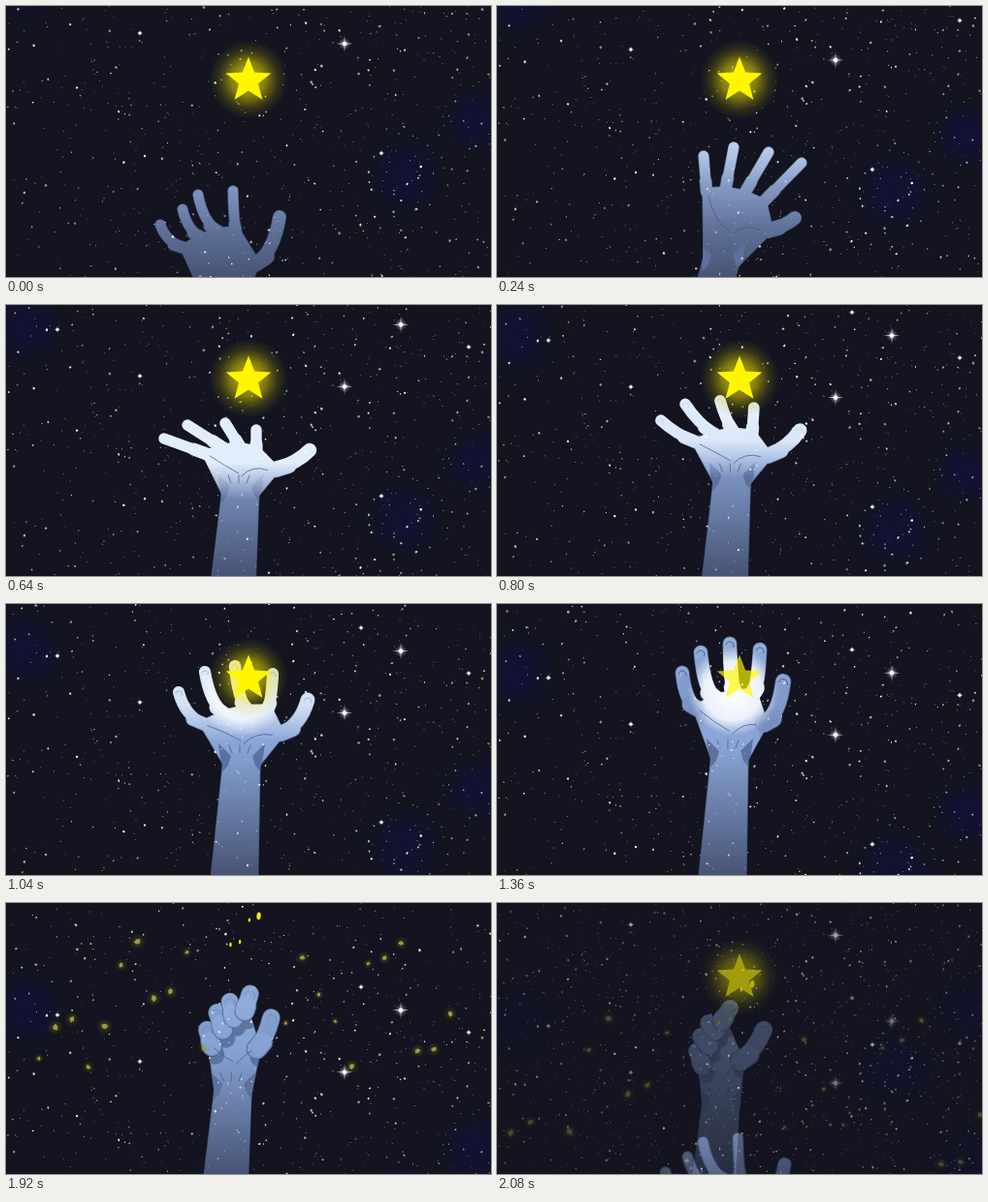
Animation, 500 px wide and 280 px high, one loop 2160 ms. Source, as an HTML page with a canvas:

```html
<!DOCTYPE html>
<html lang="en">
<head>
<meta charset="utf-8">
<title>Reaching for a star</title>
<style>
html, body { margin: 0; width: 100%; height: 100%; overflow: hidden; background: #13141f; }
canvas { display: block; width: 500px; height: 280px; }
</style>
</head>
<body>
<canvas id="stage" width="500" height="280"></canvas>
<script>
const W = 500, H = 280, LOOP = 2160, STEP = 80, FADE_FROM = 1920, BURST = 1440;
const DRIFT = 0.0707; // sky speed, px per ms
const BG = '#13141f', INK = '#43557f', SHADE = '#5c719f', TAU = Math.PI * 2;
const stage = document.getElementById('stage').getContext('2d');
const sheet = () => Object.assign(document.createElement('canvas'), { width: W, height: H }).getContext('2d');
const next = sheet(), hand = sheet();

let seed = 4711;
const rnd = () => (seed = (seed * 16807) % 2147483647) / 2147483647;
const between = (a, b) => a + (b - a) * rnd();
const clamp = v => Math.max(0, Math.min(1, v));
const ramp = (t, from, to) => clamp((t - from) / (to - from));

// Blends numbers, points and whole poses
function mix(a, b, u) {
  if (typeof a === 'number') return a + (b - a) * u;
  if (Array.isArray(a)) return a.map((v, i) => mix(v, b[i], u));
  return Object.fromEntries(Object.keys(a).map(k => [k, mix(a[k], b[k], u)]));
}

function radial(c, x, y, r, stops) {
  const g = c.createRadialGradient(x, y, 0, x, y, r);
  stops.forEach(([at, col]) => g.addColorStop(at, col));
  c.fillStyle = g;
  c.fillRect(x - r, y - r, 2 * r, 2 * r);
}

function vertical(c, y0, y1, stops) {
  const g = c.createLinearGradient(0, y0, 0, y1);
  stops.forEach(([at, col]) => g.addColorStop(at, col));
  return g;
}

function starPath(c, x, y, spikes, outer, inner) {
  c.beginPath();
  for (let i = 0; i < spikes * 2; i++) {
    const a = i * Math.PI / spikes - TAU / 4, r = i % 2 ? inner : outer;
    c.lineTo(x + Math.cos(a) * r, y + Math.sin(a) * r);
  }
  c.closePath();
}

// Key poses. Tips run from little finger to thumb; hook bends the fingers, fold closes the fist
const poses = [
  { t: 0, wrist: [224, 300], left: [184, 250], right: [237, 232], hook: .25, fold: 0, light: .1, glow: 0,
    tips: [[159, 226], [182, 210], [198, 195], [234, 191], [282, 218]] },
  { t: 240, wrist: [232, 260], left: [216, 192], right: [274, 203], hook: 0, fold: 0, light: .6, glow: 0,
    tips: [[213, 155], [244, 146], [280, 151], [314, 162], [307, 219]] },
  { t: 640, wrist: [242, 190], left: [207, 154], right: [258, 150], hook: 0, fold: 0, light: 1, glow: 0,
    tips: [[163, 138], [187, 124], [226, 122], [258, 129], [313, 150]] },
  { t: 1040, wrist: [243, 160], left: [204, 124], right: [270, 108], hook: .25, fold: .1, light: .95, glow: .9,
    tips: [[178, 91], [205, 70], [236, 64], [275, 72], [311, 99]] },
  { t: 1360, wrist: [240, 155], left: [206, 108], right: [264, 92], hook: .3, fold: .45, light: .15, glow: 1,
    tips: [[191, 71], [210, 50], [240, 41], [271, 47], [295, 80]] },
  { t: 1680, wrist: [239, 167], left: [213, 118], right: [267, 96], hook: 0, fold: 1, light: .1, glow: 0,
    tips: [[209, 98], [229, 76], [250, 69], [269, 71], [271, 100]] },
  { t: 2080, wrist: [231, 205], left: [212, 168], right: [232, 122], hook: 0, fold: .85, light: .1, glow: 0,
    tips: [[206, 153], [210, 138], [218, 124], [240, 109], [275, 131]] }
];

function poseAt(t) {
  const i = Math.max(0, poses.findLastIndex(p => p.t <= t));
  const a = poses[i], b = poses[i + 1] || a;
  return mix(a, b, a === b ? 0 : ramp(t, a.t, b.t));
}

// Arm, palm and limbs worked out from a pose
function anatomy(p) {
  const [wx, wy] = p.wrist, half = 19;
  const foot = 18 + Math.max(0, 290 - wy) * .05;
  const arm = [[wx - half, wy], [wx + half, wy], [wx - 8 + foot, 290], [wx - 8 - foot, 290]];
  const roots = [0, 1, 2, 3].map(i => {
    const [x, y] = mix(p.left, p.right, i / 3);
    return [x, y - (i % 3 ? 5 : 0)];
  });
  const [tx, ty] = mix(p.right, arm[1], .5);
  roots.push([tx + mix(18, 8, p.fold), ty]);
  const palm = [[wx - half + 4, wy + 5], ...roots, [wx + half - 4, wy + 5]];
  const limbs = roots.map((root, i) => {
    const tip = p.tips[i], h = i === 4 ? Math.max(.15, p.hook) : p.hook;
    const joint = [mix(root[0], tip[0], .5 + h), mix(root[1], tip[1], .5 - h)];
    return { root, joint, tip, r: mix(i === 4 ? 6.5 : 5, 9, p.fold) };
  });
  return { arm, palm, limbs };
}

function poly(c, pts) {
  c.beginPath();
  pts.forEach(q => c.lineTo(...q));
  c.closePath();
}

function limb(c, { root, joint, tip, r }, col, extra = 0) {
  c.strokeStyle = col;
  c.lineWidth = 2 * (r + extra);
  c.beginPath();
  c.moveTo(...root);
  c.quadraticCurveTo(...joint, ...tip);
  c.stroke();
  c.lineWidth *= 1.15;
  c.beginPath();
  c.moveTo(...root);
  c.lineTo(...mix(root, joint, .6));
  c.stroke();
}

function body(c, { arm, palm, limbs }, col, extra) {
  c.fillStyle = c.strokeStyle = col;
  for (const [pts, pad] of [[arm, 0], [palm, 4]]) {
    poly(c, pts);
    c.fill();
    c.lineWidth = 2 * (pad + extra) || .1;
    c.stroke();
  }
  limbs.forEach(l => limb(c, l, col, extra));
}

function creases(c, p, { palm, limbs }) {
  const [wx, wy] = p.wrist, heart = mix(p.wrist, mix(p.left, p.right, .5), .45);
  const side = limbs[4].root;
  c.strokeStyle = INK;
  c.lineWidth = .9;
  c.globalAlpha = .8;
  c.beginPath();
  c.moveTo(...mix(p.left, heart, .1));
  c.quadraticCurveTo(heart[0] - 14, heart[1] - 8, heart[0] + 2, heart[1] + 1);
  c.moveTo(...mix(side, heart, .2));
  c.quadraticCurveTo(heart[0] + 16, heart[1] - 8, heart[0] + 5, heart[1] + 4);
  for (const k of [-1, 0, 1]) {
    c.moveTo(wx + k * 11 - 2, wy - 14);
    c.lineTo(wx + k * 8 - 2, wy - 6);
  }
  c.stroke();
  // Nails show while the fingers are half closed
  c.globalAlpha = 4 * p.fold * (1 - p.fold);
  for (const { tip: [x, y], r } of limbs) {
    c.beginPath();
    c.arc(x, y + 2, r * .6, Math.PI * 1.1, Math.PI * 2.1);
    c.stroke();
  }
  c.globalAlpha = 1;
}

function drawHand(c, t) {
  const late = Math.min(0, t); // before the loop point the hand is still below
  const p = poseAt(t), a = anatomy(p), [wx, wy] = p.wrist, h = hand;
  const top = Math.min(...p.tips.map(q => q[1])) - 6;
  const skin = vertical(h, 60, 285, [[0, 'rgb(144,174,224)'], [.4, 'rgb(136,163,212)'], [1, 'rgb(68,80,112)']]);

  h.clearRect(0, 0, W, H);
  h.lineCap = h.lineJoin = 'round';
  body(h, a, INK, .7);
  body(h, a, skin, 0);
  h.globalCompositeOperation = 'source-atop';

  // Wrist shadows
  h.fillStyle = SHADE;
  for (const s of [-1, 1]) {
    poly(h, [[wx + s * 24, wy - 16], [wx + s * 11, wy - 3], [wx + s * 14, wy + 7], [wx + s * 20, wy + 14]]);
    h.fill();
  }
  // Closed fingers lie over the palm
  for (const l of a.limbs) {
    h.globalAlpha = clamp(p.fold * 1.6 - .6);
    h.save();
    h.translate(3, 9);
    limb(h, l, SHADE);
    h.restore();
  }
  for (const l of a.limbs) {
    h.globalAlpha = clamp(p.fold * 1.6 - .6);
    limb(h, l, INK, .6);
    limb(h, l, skin);
  }
  h.globalAlpha = 1;

  const pale = alpha => `rgba(226,237,252,${alpha})`;
  h.fillStyle = vertical(h, top, top + 85, [[0, pale(p.light)], [.55, pale(p.light ** 4)], [1, pale(0)]]);
  h.fillRect(0, 0, W, H);
  h.globalAlpha = p.glow;
  radial(h, 243, 90, 46, [[0, '#fff'], [.65, 'rgba(248,251,255,.9)'], [1, 'rgba(240,246,255,0)']]);
  h.globalAlpha = 1;
  creases(h, p, a);
  h.globalCompositeOperation = 'source-over';
  c.drawImage(h.canvas, -late * .18, -late * .65);
}

// Sky: places hold for time 0
const flares = [[349, 39, 9], [407, -25, 9], [138, 28, 4], [53, -20, 4], [477, -2, 4], [366, -49, 4], [387, 152, 4]];
const dots = Array.from({ length: 1050 }, () => {
  const size = rnd() ** 4;
  return { x: W * rnd() ** .85, y: between(-165, 300), r: .45 + size * 1.05, squash: between(.6, 1), alpha: between(.45, 1), turn: between(0, 3) };
});
const clouds = [[410, 175, 44], [484, 118, 38], [20, -25, 44]];

function drawSky(c, dy) {
  c.fillStyle = '#fff';
  for (const d of dots) {
    c.globalAlpha = d.alpha;
    c.beginPath();
    c.ellipse(d.x, d.y + dy, d.r, d.r * d.squash, d.turn, 0, TAU);
    c.fill();
  }
  c.globalAlpha = 1;
  for (const [x, y, r] of flares) {
    radial(c, x, y + dy, r * .7, [[0, 'rgba(255,255,255,.5)'], [1, 'rgba(255,255,255,0)']]);
    c.fillStyle = 'rgba(255,255,255,.8)';
    starPath(c, x, y + dy, 4, r, r * .1);
    c.fill();
    c.fillStyle = '#fff';
    c.beginPath();
    c.arc(x, y + dy, 1 + r * .15, 0, TAU);
    c.fill();
  }
}

function drawStar(c, t) {
  c.globalAlpha = 1 - ramp(t, 1040, 1360);
  radial(c, 250, 76, 41, [[0, 'rgba(255,240,0,.8)'], [.45, 'rgba(235,222,0,.5)'], [.75, 'rgba(190,180,0,.18)'], [1, 'rgba(160,150,0,0)']]);
  c.globalAlpha = t <= 1200 ? 1 : .95 * (1 - ramp(t, 1280, 1560));
  c.fillStyle = '#fff600';
  starPath(c, 250, 77, 5, 24.5, 10.5);
  c.fill();
  c.globalAlpha = 1;
}

// Fragments fan out, slow down sideways and fall
const bits = Array.from({ length: 26 }, (_, i) => {
  const side = (i / 25) * 2 - 1, bright = Math.abs(side) < .14;
  return { reach: bright ? side * 80 : side * 140, rise: bright ? between(.46, .6) : between(.24, .52),
    r: between(1.6, 3.2), turn: between(0, TAU), bright };
});

function drawBits(c, t) {
  const s = t - BURST;
  if (s <= 0) return;
  for (const b of bits) {
    const x = 246 + b.reach * (s / 240) ** .6, y = 78 - b.rise * s + .0009 * s * s;
    if (!b.bright) radial(c, x, y, b.r * 2.8, [[0, 'rgba(150,140,20,.4)'], [1, 'rgba(120,110,0,0)']]);
    c.fillStyle = b.bright ? '#ffec00' : '#a09848';
    c.beginPath();
    if (b.bright) c.ellipse(x, y, b.r * .7, b.r * 1.3, .1, 0, TAU);
    else for (let k = 0; k < 5; k++) {
      const a = b.turn + t * .004 + k * TAU / 5, q = b.r * (k % 2 ? 1.25 : .9);
      c.lineTo(x + Math.cos(a) * q, y + Math.sin(a) * q);
    }
    c.fill();
  }
}

function scene(c, t) {
  c.fillStyle = BG;
  c.fillRect(0, 0, W, H);
  for (const [x, y, r] of clouds) {
    radial(c, x, y + t * DRIFT, r, [[0, 'rgba(17,15,70,.6)'], [.5, 'rgba(17,15,66,.4)'], [1, 'rgba(17,15,60,0)']]);
  }
  drawHand(c, t);
  drawSky(c, t * DRIFT);
  drawStar(c, t);
  drawBits(c, t);
}

const start = performance.now();
function tick() {
  const t = Math.floor((performance.now() - start) % LOOP / STEP) * STEP;
  scene(stage, t);
  // The end dissolves into the next round
  if (t > FADE_FROM) {
    scene(next, t - LOOP);
    stage.globalAlpha = (t - FADE_FROM) / 265;
    stage.drawImage(next.canvas, 0, 0);
    stage.globalAlpha = 1;
  }
  requestAnimationFrame(tick);
}
tick();
</script>
</body>
</html>
```
